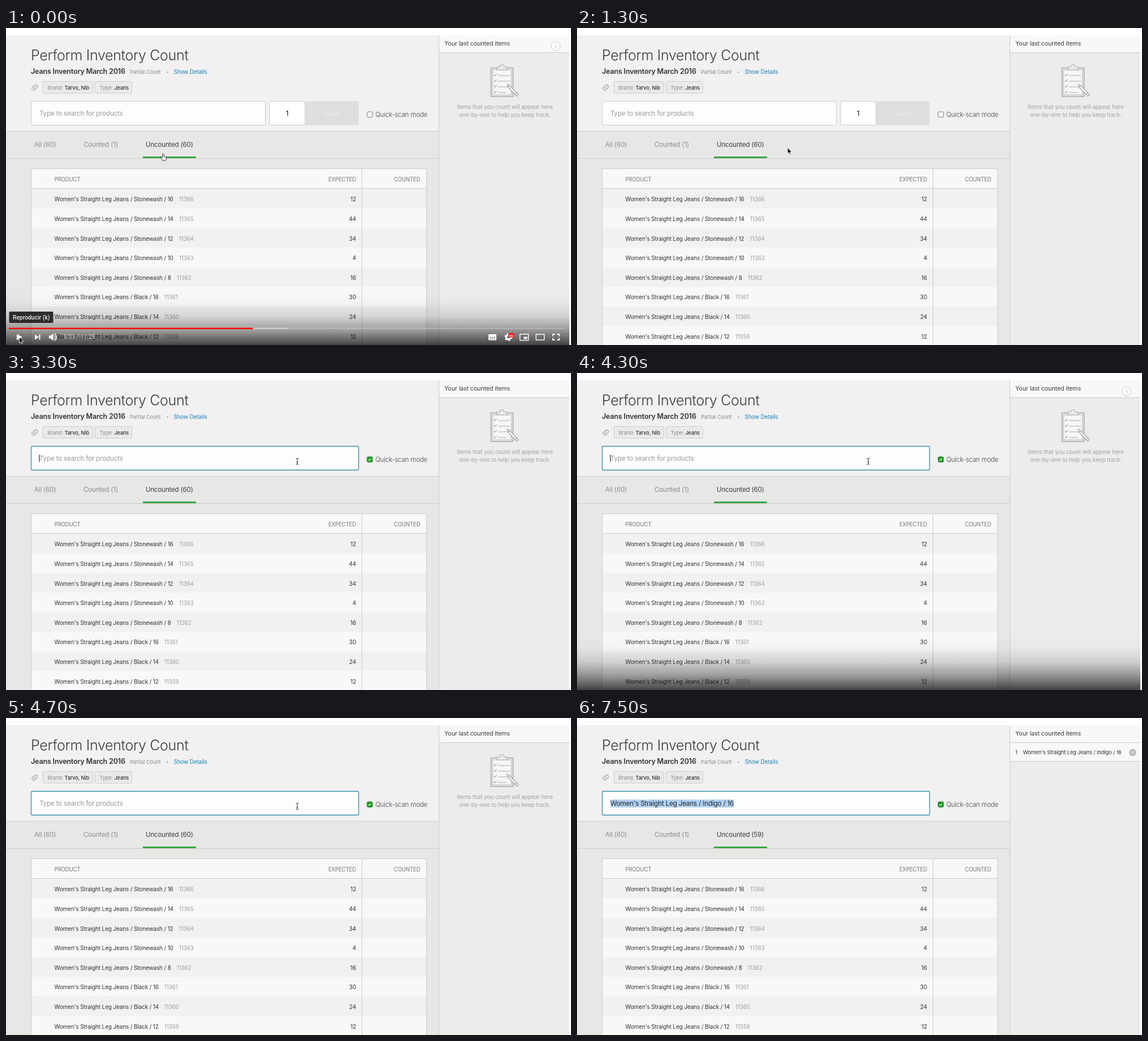
Recreate the animation shown at these times as an HTML page. Size 999x560 px, loop 8 s.

```html
<!DOCTYPE html>
<html lang="en">
<head>
<meta charset="utf-8">
<title>Inventory count</title>
<style>
html, body { margin: 0; width: 100%; height: 100%; overflow: hidden; background: #fff; }
svg { display: block; width: 999px; height: 560px; }
text { font-family: Inter, "Open Sans", sans-serif; letter-spacing: -.015em; white-space: pre; }
.player text { font-family: Roboto, Arial, sans-serif; font-weight: 500; letter-spacing: 0; }
</style>
</head>
<body>
<svg id="stage" viewBox="0 0 999 560" xmlns="http://www.w3.org/2000/svg"></svg>
<script>
const LOOP = 8000, STEP = 100;
const LINE = '#cbcbc9', PALE = '#f8f8f7', TINT = '#f2f0f1', DARK = '#333', GREY = '#8c8c8c';

const rect = (x, y, w, h, fill, more = '') =>
  `<rect x="${x}" y="${y}" width="${w}" height="${h}" fill="${fill}" ${more}/>`;
const text = (x, y, size, str, fill = DARK, more = '') =>
  `<text x="${x}" y="${y}" font-size="${size}" fill="${fill}" ${more}>${str}</text>`;
const path = (d, more = '') => `<path d="${d}" ${more}/>`;
const group = (id, body, more = '') => `<g id="${id}" ${more}>${body}</g>`;
const end = 'text-anchor="end"', mid = 'text-anchor="middle"';
const box = `stroke="${LINE}" rx="2"`;

function header() {
  const chip = (x, w, label, value) =>
    rect(x, 94.5, w, 20.5, '#ebeae9', box) +
    text(x + 8, 108.5, 9.2, `${label}: <tspan fill="${DARK}" font-weight="500">${value}</tspan>`, GREY);
  return rect(0, 13, 765, 170, TINT) +
    text(44, 57, 25.1, 'Perform Inventory Count', '#3c3c3c', 'font-weight="300"') +
    text(44, 81, 12.55, 'Jeans Inventory March 2016', DARK, 'font-weight="600"') +
    text(219, 81, 9.25, 'Partial Count', GREY) +
    `<circle cx="285.5" cy="78" r="1" fill="#777"/>` +
    text(296.5, 80.8, 9.95, 'Show Details', '#1583b8') +
    path('M45 106.5L51 100.5L55 101L55.5 105L49.5 111ZM47.5 106.5L51.5 102.5M49.5 108.5L53 105',
      'fill="none" stroke="#8a8a8a"') +
    chip(65.5, 88, 'Brand', 'Tarvo, Nib') + chip(157.5, 65, 'Type', 'Jeans');
}

function searchBar() {
  return rect(466, 129.5, 62.5, 42, '#fff', box) +
    text(497, 155, 11.5, '1', '#222', mid + ' font-weight="500"') +
    rect(528.5, 129.5, 95, 42, '#dededc') +
    text(576, 155, 10.4, 'Count', '#eeeeec', mid) +
    rect(44.5, 129.5, 414, 42, '#fdfdfd', 'id="field" rx="2"') +
    rect(59, 144, 218, 14, '#b0d2f3', 'id="mark"') +
    text(59, 155, 11.65, '', GREY, 'id="query"') +
    rect(58.5, 144.5, 1.2, 12.5, '#222', 'id="caret"') +
    rect(638.5, 148, 9.5, 9.5, '#fff', 'id="check" rx="2"') +
    path('M641 153L642.6 154.7L645.7 151', 'id="tick" fill="none" stroke="#fff" stroke-width="1.1"') +
    text(653, 157, 11.5, 'Quick-scan mode', '#444', 'font-weight="300"');
}

function tabs() {
  return rect(0, 183, 765, 377, '#e7e7e5') +
    rect(0, 230, 765, 1, LINE) +
    text(50, 210, 11.55, 'All (60)', GREY) +
    text(137, 210, 11.55, 'Counted (1)', GREY) +
    text(247, 210, 11.55, '', '#3c3c3c', 'id="left"') +
    rect(242, 227, 94, 3, '#3ba545');
}

function table() {
  const kinds = ['Stonewash / 16', 'Stonewash / 14', 'Stonewash / 12', 'Stonewash / 10',
    'Stonewash / 8', 'Black / 16', 'Black / 14', 'Black / 12'];
  const expected = [12, 44, 34, 4, 16, 30, 24, 12];
  const rows = kinds.map((kind, i) => {
    const y = 284 + i * 34.65;
    return rect(44, y, 699, 34.65, i % 2 ? '#f8f8f6' : TINT) +
      text(85.5, y + 22.2, 10.03, `Women's Straight Leg Jeans / ${kind}` +
        `<tspan dx="10" fill="#a0a0a0">${11366 - i}</tspan>`) +
      text(619, y + 22.2, 10.2, expected[i], DARK, end);
  }).join('');
  return rect(44, 248, 699, 312, '#f8f8f6') + rows +
    text(85.5, 270.7, 9.65, 'PRODUCT', '#777') +
    text(619, 270.7, 9.65, 'EXPECTED', '#777', end) +
    text(732.5, 270.7, 9.65, 'COUNTED', '#777', end) +
    rect(44, 283, 699, 1, LINE) + rect(629, 248, 1, 312, LINE) +
    rect(44.5, 248.5, 699, 330, 'none', `stroke="${LINE}"`);
}

function clipboard() {
  const items = [84, 94, 104, 114].map((y, i) =>
    `M863 ${y - 1}l1.5 1.5l3 -3.5M870 ${y}H${i < 2 ? 891 : 888 - i}`).join('');
  return `<g fill="none" stroke="#a9a9a9" stroke-width="1.2" stroke-linejoin="round">` +
    rect(857.5, 70.5, 39, 50.5, '#e6e6e5', 'stroke-width="1.5"') +
    rect(860.5, 74, 33, 44, '#f6f6f5', 'stroke="#c0c0c0"') +
    path('M868 74V69H873Q873.5 65 877 65T881 69H886V74Z', 'fill="#edeceb"') +
    path(items) +
    path('M886 99L887.5 104.5L903 120.5L906 117.5L890.5 101.5ZM887.5 104.5L890.5 101.5M900 117.5L903 114.5',
      'fill="#f2f2f1"') + '</g>';
}

function sidebar() {
  return rect(765, 13, 231, 547, '#edeceb') +
    rect(766, 13, 230, 30, PALE) + rect(766, 43, 230, 1, LINE) +
    text(775, 30.7, 10.8, 'Your last counted items', '#3c3c3c') +
    group('empty', clipboard() +
      text(882, 142.5, 10.05, 'Items that you count will appear here', '#a3a3a3', mid) +
      text(882, 156.5, 10.05, 'one-by-one to help you keep track.', '#a3a3a3', mid)) +
    group('item', rect(766, 44, 230, 32, PALE) + rect(766, 76, 230, 1, LINE) +
      text(775, 64.3, 9.3, '1') +
      text(788.5, 64.3, 9.3, "Women's Straight Leg Jeans / Indigo / 16") +
      `<circle cx="982.5" cy="61" r="6.5" fill="#bdbdbd"/>` +
      path('M980 58.5l5 5m0 -5l-5 5', 'stroke="#f4f4f4"')) +
    rect(765, 13, 1, 547, LINE);
}

function player() {
  const shade = [0, .02, .12, .38, .72].map((a, i) =>
    `<stop offset="${i / 4}" stop-color="#000" stop-opacity="${a}"/>`).join('');
  const outline = 'fill="none" stroke="#fff" stroke-width="1.4"';
  const icons =
    path('M51 541.5L58 546L51 550.5ZM58.5 541.5H60.5V550.5H58.5Z') +
    path('M76 543.5H79L83.5 539.5V552.5L79 548.5H76Z') +
    path('M85.5 542.5Q88.5 546 85.5 549.5M86 539.5Q93 546 86 552.5', outline) +
    rect(853, 541, 14, 10.5, '#fff', 'rx="1"') +
    path('M855 546.5H858M859.5 546.5H865M855 549H861M862.5 549H865', 'stroke="#666" stroke-width="1.2"') +
    `<circle cx="888.5" cy="546" r="4" fill="none" stroke="#fff" stroke-width="3.2"/>` +
    `<circle cx="888.5" cy="546" r="6" fill="none" stroke="#fff" stroke-width="2" stroke-dasharray="3.14"/>` +
    rect(888, 539, 10.5, 8, '#e02020', 'rx="1"') +
    text(893.2, 545.5, 6, 'HD', '#fff', mid) +
    rect(908.7, 540.7, 15, 11, 'none', outline) + rect(915.5, 545.5, 6, 4, '#fff') +
    rect(937.2, 541.2, 14.5, 9.8, 'none', outline) +
    path('M967 544.5V541H970.5M974.5 541H978V544.5M978 547.5V551H974.5M970.5 551H967V547.5',
      'fill="none" stroke="#fff" stroke-width="1.8"');
  return `<defs><linearGradient id="shade" x2="0" y2="1">${shade}</linearGradient></defs>` +
    group('dim', rect(0, 460, 996, 100, 'url(#shade)') +
      `<circle cx="972" cy="32" r="8" fill="#fff" fill-opacity=".5" stroke="#c9c9c9"/>` +
      path('M972 30.5V36M972 27.5V29', 'stroke="#c2c2c2" stroke-width="1.3"')) +
    group('controls',
      rect(5, 529.5, 983, 2.5, '#fff', 'opacity=".2"') +
      rect(5, 529.5, 493, 2.5, '#fff', 'opacity=".3"') +
      rect(5, 529.5, 431.5, 2.5, '#f00') +
      path('', 'id="toggle"') + icons +
      text(102, 549, 10.3, '5:01 / 11:25', '#ddd', 'opacity=".85"'), 'class="player" fill="#fff"') +
    group('tip', rect(5.5, 501, 78, 20, '#1c1c1c', 'id="tipBox" rx="2" opacity=".9"') +
      text(12, 514.5, 10.3, '', '#eee', 'id="tipText"'), 'class="player"');
}

function pointers() {
  const arrow = path('M0 0V10.5L2.4 8.3L4.2 12.3L6 11.5L4.2 7.6H7.6Z',
    'fill="#111" stroke="#fff" stroke-width=".8"');
  const hand = path('M-1.5 -5Q0 -6.5 1 -5V-1L5 0Q6 .5 5.5 3L4.5 6H-1L-4 2Q-5 0 -3.5 0L-1.5 1Z',
    'fill="#fff" stroke="#333"');
  const beam = path('M-2.5 -5.5Q0 -5.5 0 -4Q0 -5.5 2.5 -5.5M0 -4.5V4.5M-2.5 5.5Q0 5.5 0 4Q0 5.5 2.5 5.5M-1.5 1.5H1.5',
    'fill="none" stroke="#333"');
  return group('arrow', arrow) + group('hand', hand) + group('beam', beam) +
    group('outer', arrow, 'transform="translate(23.5 546)"');
}

const stage = document.getElementById('stage');
stage.innerHTML = rect(0, 0, 999, 560, '#fff') + tabs() + header() + rect(0, 182, 765, 1, LINE) +
  searchBar() + table() + sidebar() + rect(996, 0, 3, 560, '#fff') + player() + pointers();

const el = {};
stage.querySelectorAll('[id]').forEach(n => el[n.id] = n);
const set = (id, name, value) => el[id].setAttribute(name, value);
const alpha = (id, a) => set(id, 'opacity', +a);
const label = (id, str) => { if (el[id].textContent !== str) el[id].textContent = str; };

const ramp = (t, a, b) => Math.min(1, Math.max(0, (t - a) / (b - a)));
const ease = p => p * p * (3 - 2 * p);

// time, x, y of the pointer inside the video
const track = [[400, 278, 228], [900, 349, 220], [1100, 335, 219], [2000, 630, 160],
  [2200, 643, 154], [2900, 643, 154], [3200, 515, 156]];

function pointerAt(t) {
  const i = track.findIndex(k => k[0] > t);
  if (i === 0) return track[0].slice(1);
  if (i < 0) return track[track.length - 1].slice(1);
  const [ta, xa, ya] = track[i - 1], [tb, xb, yb] = track[i];
  const p = ease(ramp(t, ta, tb));
  return [xa + (xb - xa) * p, ya + (yb - ya) * p];
}

function caretOn(t) {
  const blinks = [[3100, 3600], [4100, 4600], [5000, 5400], [6100, 6600]];
  return blinks.some(([a, b]) => t >= a && t < b);
}

function draw(t) {
  const playing = t >= 300, quick = t >= 2600, scanned = t >= 6100, found = t >= 6800;

  const fade = 1 - ramp(t, 800, 1000);
  const flash = ramp(t, 3800, 4100) * (1 - ramp(t, 4300, 4500));
  alpha('controls', fade);
  alpha('dim', Math.max(fade, flash));
  alpha('tip', fade * fade);
  set('toggle', 'd', playing ? 'M19 541H22V551H19ZM25.5 541H28.5V551H25.5Z' : 'M19 540.5L29 546L19 551.5Z');
  label('tipText', playing ? 'Pausa (k)' : 'Reproducir (k)');
  set('tipBox', 'width', playing ? 57 : 78);
  alpha('outer', t < 800);

  const focused = t >= 2700;
  set('field', 'width', 414 + 165 * ease(ramp(t, 2600, 3000)));
  set('field', 'stroke', focused ? '#3590b0' : LINE);
  set('field', 'stroke-width', focused ? 1.3 : 1);
  set('check', 'fill', quick ? '#1f9a27' : '#fafafa');
  set('check', 'stroke', quick ? '#1f8a27' : '#777');
  alpha('tick', quick);

  label('query', found ? "Women's Straight Leg Jeans / Indigo / 16" : scanned ? '11356' : 'Type to search for products');
  set('query', 'fill', scanned ? '#222' : '#999');
  alpha('mark', found);
  alpha('caret', caretOn(t));
  set('caret', 'x', scanned ? 90.5 : 58.5);
  label('left', `Uncounted (${scanned ? 59 : 60})`);

  const shown = ramp(t, 6700, 7000);
  alpha('empty', 1 - shown);
  alpha('item', shown);

  const at = `translate(${pointerAt(t)})`;
  ['arrow', 'hand', 'beam'].forEach(id => set(id, 'transform', at));
  alpha('hand', t < 700);
  alpha('arrow', t >= 700 && t < 3000);
  alpha('beam', t >= 3000 && !found);
}

const start = performance.now();
function tick() {
  const t = (performance.now() - start) % LOOP;
  draw(Math.floor(t / STEP) * STEP);
  requestAnimationFrame(tick);
}
tick();
</script>
</body>
</html>
```
